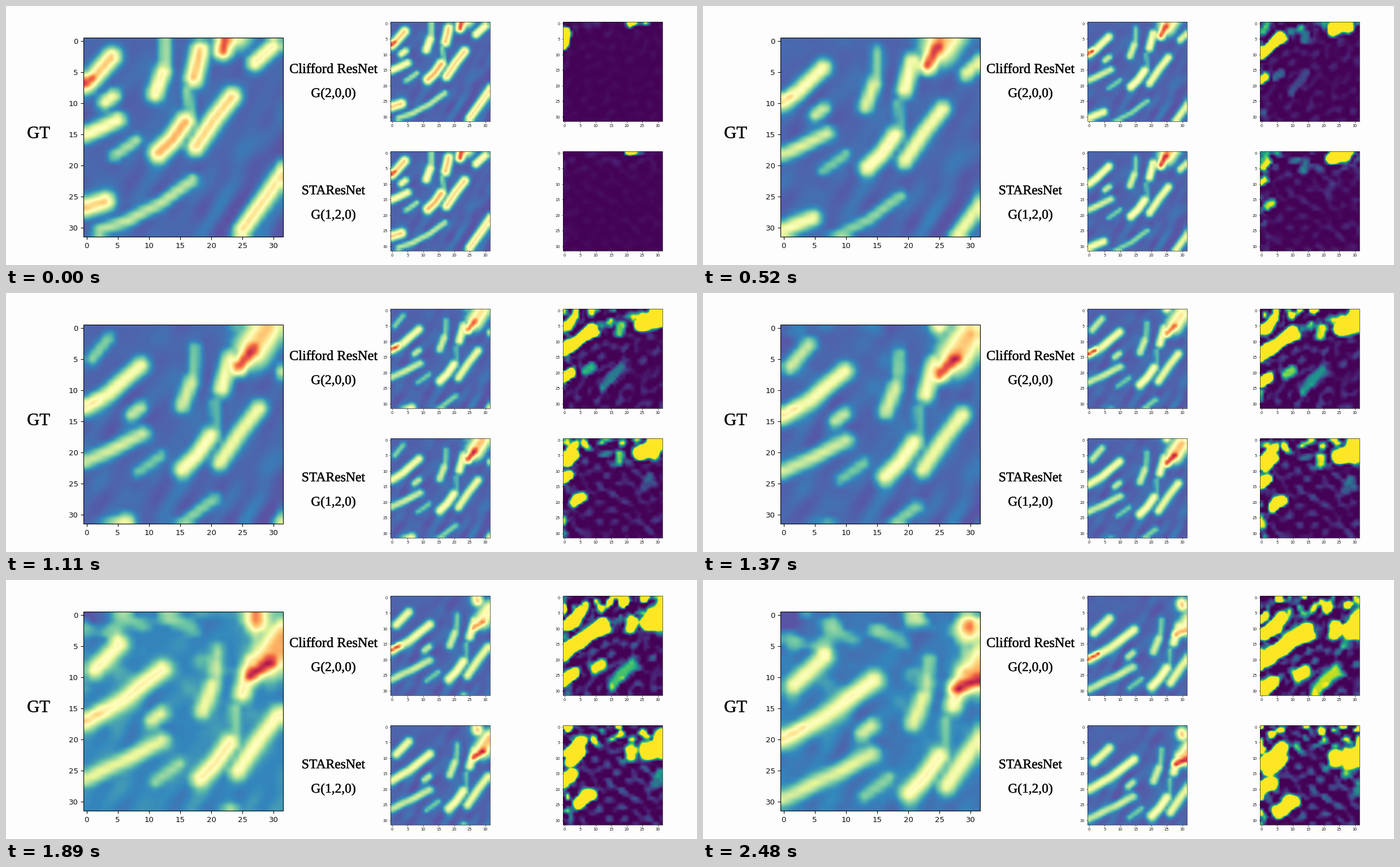
Write a matplotlib script that moves like this. It is 1222 px wide and 458 px high and loops after 2810 ms.

```python
import numpy as np
import matplotlib
import matplotlib.pyplot as plt
from matplotlib.animation import FuncAnimation
from matplotlib.collections import LineCollection
from matplotlib.patheffects import withStroke
from matplotlib.transforms import Affine2D

W, H, DPI = 1222, 458, 100
N = 32
HOLDS = [33 if s in (2, 8, 9) else 26 for s in range(10)]  # units of 10 ms
STEP = np.repeat(np.arange(len(HOLDS)), HOLDS)
Y, X = np.mgrid[0:N, 0:N].astype(float)

# Streaks: strength and key points at the start; the flow carries the points
HOT = [(0, 6.6), (.6, 6.2)]
ARC = [(0, 7), (1.3, 5.8), (4, 2.6)]
CORNER = [(.3, 0), (1.2, -2.5)]
BAND = [(x, 31 - .2 * x - .018 * x * x) for x in range(2, 18, 5)]
STREAKS = [
    (.6, ARC),
    (.3, BAND),
    (.4, [(3, 9.8), (4.3, 8.9)]),
    (.46, [(0, 15), (2.5, 14), (5, 12.7)]),
    (.6, [(0, 26.8), (3, 25.8)]),
    (.25, [(4.5, 18.5), (8, 16)]),
    (.5, [(11, 8.5), (12.3, 5)]),
    (.28, [(12.6, 4), (12.6, 0)]),
    (.64, [(11.5, 18), (13.7, 16), (15.8, 13)]),
    (.22, [(16.2, 8), (16.8, 13)]),
    (.58, [(17.5, 17), (20.5, 12.5), (23.3, 9)]),
    (.6, [(17.2, 6), (18.2, 1.5)]),
    (.48, [(27, 3.5), (30, .8)]),
    (.54, [(25, 30.5), (32, 20.5)]),
]
LATE = [(.4, CORNER), (.6, [(18.5, -4.6), (18.8, -4)])]
ERR_BOTH = [(3, CORNER), (1.7, [(13.5, 1.5), (13.5, 3.5)])]
ERR_TOP = [
    (6, [(-.5, 15.5), (.8, 14.6)]),
    (1.4, [(2.8, 15.2), (4.6, 14)]),
    (.9, [(9, 20), (14.5, 13.5)]),
]
ERR_LOW = [
    (5, HOT),
    (5, [(.4, 2), (1.2, .6)]),
    (4, [(1.2, 14.5), (2.2, 13.8)]),
    (.5, [(22, 11), (23.5, 8)]),
]


def carry(points, s):
    """Move points with the flow, which slides down along the left edge."""
    x, y = np.array(points, float).T
    ramp = np.clip(x / 2.5, 0, 1)
    vx = (1.2 - .014 * y) * ramp
    vy = .82 + .02 * y + .5 * (1 - ramp)
    return np.column_stack([x + vx * s, y + vy * s])


def streak(points, width, power=2, warp=0):
    """Soft stroke along a polyline: 1 on the line, one half at its width."""
    best = np.inf
    for (x0, y0), (x1, y1) in zip(points[:-1], points[1:]):
        dx, dy = x1 - x0, y1 - y0
        t = np.clip(((X - x0) * dx + (Y - y0) * dy) / (dx * dx + dy * dy), 0, 1)
        best = np.minimum(best, np.hypot(X - x0 - t * dx, Y - y0 - t * dy))
    return np.exp(-.69 * (best * (1 + warp) / width) ** power)


def front(s):
    return np.array([22.3 + .8 * s, 1.27 * s - .2])


def noise(seed, s, low=.45, high=1.6, slant=None, count=26):
    """Smooth texture that drifts with the flow."""
    rng = np.random.default_rng(seed)
    k = rng.uniform(low, high, count)
    a = rng.uniform(0, 2 * np.pi, count)
    if slant is not None:
        a = np.radians(90 - slant) + rng.normal(0, .16, count)
    ph = rng.uniform(0, 2 * np.pi, count)
    px, py = X - 1.05 * s, Y - 1.1 * s
    waves = [np.cos(q * (px * np.cos(b) + py * np.sin(b)) + p)
             for q, b, p in zip(k, a, ph)]
    return np.sum(waves, axis=0) / np.sqrt(count / 2)


def wave_field(s, ground, hot, red, mottle=0):
    dim = .7 + .3 * np.exp(-s)
    late = np.clip((s - 2) / 4, 0, 1)
    rows = [(g * dim, p) for g, p in STREAKS] + [(g * late, p) for g, p in LATE]
    parts = [g * streak(carry(p, s), (.45 + 1.2 * g) * (1 + .03 * s))
             for g, p in rows]
    parts.append(hot * streak(carry(HOT, s), .8))

    # the red front turns from steep to flat, with a warm body behind it
    c, a = front(s), np.radians(75 - 6 * s)
    along = 1.8 * np.array([np.cos(a), -np.sin(a)])
    parts.append(red * streak([c - along, c + along], 1.1))
    parts.append(.75 * red * streak([c + (1.2, -1.5), c + (3.5, -5)], 2.3))

    total = sum(p ** 3 for p in parts) ** (1 / 3)
    texture = .006 * noise(3, s) + .02 * noise(4, s, slant=57) * (X + Y) / 62
    old = mottle * np.clip((s - 4) / 4, 0, 1)
    patches = old * .13 * np.clip(noise(5, s), 0, 2) * np.exp(-Y / 8)
    dark = old * .12 * np.exp(-(X ** 2 + Y ** 2) / 10)
    return np.clip(ground + total + texture + patches - dark, .015, .95)


def error_field(s, rows, arc, seed):
    warp = .16 * noise(seed, s)
    reach = np.array([1 - np.exp(-s - .15), 1])
    w = .9 + .11 * s
    c = front(s)
    red = [c + (-.8, -.8), c + (3, -1.5), c + (5, -6)]
    big = [2.2 * streak(red, 1.3 + .22 * s, 4, warp),
           arc * streak(carry(ARC, s) * reach, 1.2 + .12 * s, 4, warp)]
    for gain, points in ERR_BOTH + rows:
        big.append(min(2.2, gain * s / 9) * streak(carry(points, s) * reach, w, 4, warp))
    base = .01 + (.012 + .016 * s) * np.clip(noise(seed + 1, s, .8, 2), 0, 2)
    edge = np.exp(-(Y / 5) ** 2) + .6 * np.exp(-(X / 1.8) ** 2)
    old = np.clip((s - .3) / 6, .04, 1.2)
    patches = 1.2 * old * edge * np.clip(noise(seed + 2, s, .7, 1.8) - .15, 0, 2)
    return base + np.maximum(np.max(big, axis=0), patches)


def cubic(n):
    """Matrix that resamples N cells to n pixels with a cubic kernel."""
    pos = (np.arange(n) + .5) * N / n - .5
    d = np.abs(pos[:, None] - np.arange(N))
    near = 1.5 * d ** 3 - 2.5 * d ** 2 + 1
    far = -.5 * d ** 3 + 2.5 * d ** 2 - 4 * d + 2
    k = np.where(d < 1, near, np.where(d < 2, far, 0))
    return k / k.sum(axis=1, keepdims=True)


def paint(field, w, h, cmap):
    big = cubic(h) @ field @ cubic(w).T
    return matplotlib.colormaps[cmap](np.clip(big, 0, 1), bytes=True)


def truth(s):
    ground = .045 + .095 * np.exp(-((s - 7.8) / 1.1) ** 2)
    return wave_field(s, ground, .42 + .36 * np.exp(-s), .8, 1)


def clifford(s):
    return wave_field(s, .038, .8, .82 - .025 * s)


def sta(s):
    return wave_field(s, .038, .78 * np.exp(-s), .82)


def clifford_error(s):
    return error_field(s, ERR_TOP, 2.2, 20)


def sta_error(s):
    return error_field(s, ERR_LOW, 0, 40)


# left, top, width, height, colour map, field
PANELS = [
    (137, 56, 353, 352, "Spectral_r", truth),
    (680, 28, 176, 176, "Spectral_r", clifford),
    (680, 257, 176, 176, "Spectral_r", sta),
    (985, 28, 176, 176, "viridis", clifford_error),
    (985, 257, 176, 176, "viridis", sta_error),
]

fig = plt.figure(figsize=(W / DPI, H / DPI), dpi=DPI, facecolor="#fdfdfd")
stage = Affine2D().scale(1 / W, -1 / H).translate(0, 1) + fig.transFigure


def label(x, y, text, px, font="DejaVu Sans", ha="center", va="center_baseline"):
    return fig.text(x, y, text, fontsize=px * 72 / DPI, family=font, ha=ha, va=va,
                    color="#0c0c0c", transform=stage)


def frame(x, y, w, h):
    main = w > 200
    tick, px, lw = (5, 13.3, .8) if main else (2.5, 6.7, .42)
    segs = [[(x, y), (x + w, y), (x + w, y + h), (x, y + h), (x, y)]]
    for v in range(0, 31, 5):
        tx, ty = x + (v + .5) * w / N, y + (v + .5) * h / N
        segs += [[(tx, y + h), (tx, y + h + tick)], [(x - tick, ty), (x, ty)]]
        label(tx, y + h + (15 if main else 7.6), str(v), px)
        label(x - (9.5 if main else 5.2), ty + .3, str(v), px, ha="right")
    fig.add_artist(LineCollection(segs, colors="black", linewidths=lw,
                                  transform=stage))


images, pictures = [], []
for x, y, w, h, cmap, field in PANELS:
    shots = [paint(field(s), w, h, cmap) for s in range(len(HOLDS))]
    pictures.append(shots)
    images.append(fig.figimage(shots[0], x, H - y - h, origin="upper"))
    frame(x, y, w, h)

for x, y, text, px in [
    (57.5, 233.5, "GT", 30.5),
    (579, 118.5, "Clifford ResNet", 24.4),
    (579, 161, "G(2,0,0)", 23.4),
    (579, 333, "STAResNet", 23.6),
    (579, 376, "G(1,2,0)", 23.4),
]:
    title = label(x, y, text, px, "Liberation Serif", va="baseline")
    title.set_path_effects([withStroke(linewidth=.35, foreground="#0c0c0c")])


def update(i):
    for im, shots in zip(images, pictures):
        im.set_data(shots[STEP[i]])
    return images


anim = FuncAnimation(fig, update, frames=len(STEP), interval=10,
                     init_func=lambda: update(0), repeat=True, repeat_delay=0)
plt.show()
```
